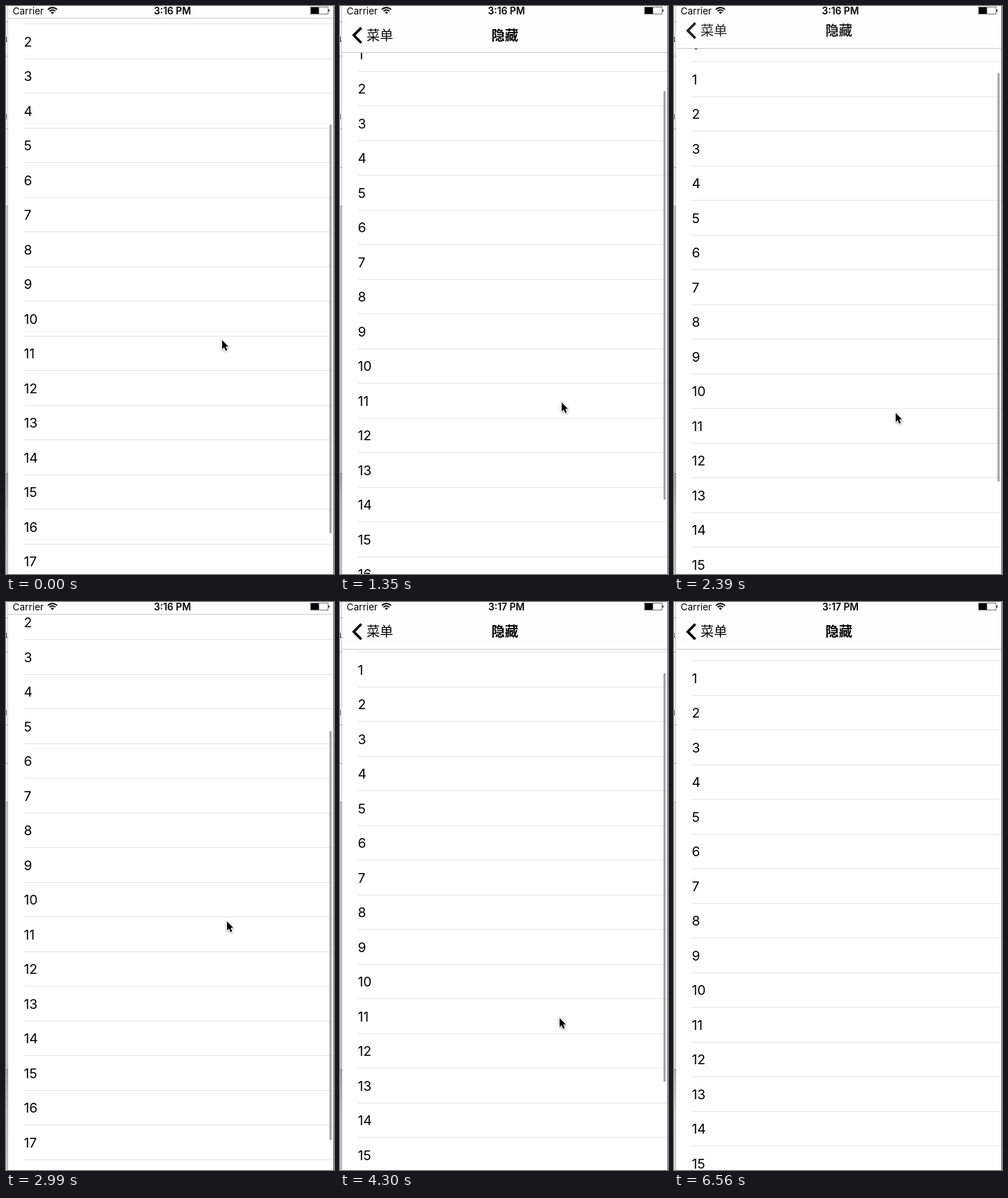
Animation, 469 px wide and 811 px high, one loop 6.61 s. Source, as an HTML page with a canvas:

```html
<!DOCTYPE html>
<html lang="zh">
<head>
<meta charset="utf-8">
<title>隐藏</title>
<style>
html, body { margin: 0; width: 100%; height: 100%; overflow: hidden; background: #fefefe; }
canvas { display: block; }
</style>
</head>
<body>
<canvas id="stage" width="469" height="811"></canvas>
<script>
const W = 469, H = 811, LOOP = 6610, PITCH = 49.5;
const LATIN = 'Inter, "Liberation Sans", sans-serif';
const CJK = '"Noto Sans CJK SC", "Noto Sans CJK", "Noto Sans CJK JP", sans-serif';
const g = document.getElementById('stage').getContext('2d');

const shortTicks = [13, 22, 23, 26, 29, 31, 33];
const tickTime = i => i * 150 - 10 * shortTicks.filter(s => s < i).length;

// Turning points of the hand: time, x, y.
const hand = [
  [-900, 293, 588], [525, 316, 430], [1612, 317, 588], [2250, 317, 588],
  [3280, 316, 426], [4180, 314, 594], [4740, 314, 594],
  [5180, 417, 789], [5330, 417, 789], [5780, 434, 805]
];

// Distance from the pointer to row "1"; it shifts when the list coasts.
const lag = [
  [0, 475.8], [300, 475.8], [650, 497.7], [1650, 497.7], [2250, 475.8],
  [2990, 475.8], [3430, 497.3], [4100, 497.3], [4600, 485.3]
];

const clamp = v => Math.min(1, Math.max(0, v));
const ease = p => (1 - Math.cos(Math.PI * p)) / 2;

function valueAt(keys, t, col = 1) {
  const next = keys.findIndex(k => k[0] > t);
  if (next < 0) return keys.at(-1)[col];
  const a = keys[next - 1], b = keys[next];
  return a[col] + (b[col] - a[col]) * ease((t - a[0]) / (b[0] - a[0]));
}

function poseAt(now) {
  let i = 0;
  while (tickTime(i + 1) <= now) i++;
  const t = tickTime(i);
  const x = valueAt(hand, t, 1), y = valueAt(hand, t, 2);
  const upward = valueAt(hand, t + 150, 2) < y;
  return {
    row: valueAt(hand, Math.min(t, 4740), 2) - valueAt(lag, t),
    pointer: t < 5780 && [Math.round(x), Math.round(y)],
    nav: clamp((y - (upward ? 538 : 517)) / 50),
    bar: t < 4740,
    clock: t < 3280 ? '3:16 PM' : '3:17 PM',
    pale: now >= 6560
  };
}

function box(color, x, y, w, h) {
  g.fillStyle = color;
  g.fillRect(x, y, w, h);
}

function text(s, x, y, font, align = 'left') {
  g.font = font;
  g.textAlign = align;
  g.fillStyle = '#000';
  g.fillText(s, x, y);
}

function path(points) {
  g.beginPath();
  points.forEach(p => g.lineTo(...p));
}

function drawRows(row) {
  for (let k = -1; k < 20; k++) {
    const mid = row + k * PITCH;
    box('#e5e5e7', 25, Math.floor(mid + PITCH / 2 - .25), W - 25, 1);
    text(String(k + 1), 25.5, mid + 6.8, '19.1px ' + LATIN);
  }
}

function drawScrollBar(row) {
  g.fillStyle = '#a0a0a0';
  g.beginPath();
  g.roundRect(462.6, 170 - .71 * row, 2.9, 584, 1.4);
  g.fill();
}

function drawNav(open) {
  const bottom = Math.round(17 + 50 * open);
  box('#fdfdfd', 3, 0, W - 3, bottom);
  box('#cbcbcd', 3, bottom, W - 3, 1);
  if (!open) return;
  g.save();
  g.globalAlpha = open;
  g.translate(0, -50 * (1 - open));
  g.strokeStyle = '#000';
  g.lineWidth = 3.6;
  path([[30.5, 31.5], [19.7, 42.4], [30.5, 53.3]]);
  g.stroke();
  text('菜单', 38, 49.3, '19px ' + CJK);
  text('隐藏', 235.7, 49.3, '600 19.2px ' + CJK, 'center');
  g.restore();
}

function drawStatus(clock) {
  text('Carrier', 9.5, 11.6, '13.6px ' + LATIN);
  text(clock, 238, 11.6, '600 13.8px ' + LATIN, 'center');
  const fan = r => {
    g.beginPath();
    g.arc(66.4, 11.2, r, -Math.PI * .76, -Math.PI * .24);
  };
  g.strokeStyle = '#000';
  g.lineWidth = 1.9;
  for (const r of [9, 5.6]) {
    fan(r);
    g.stroke();
  }
  fan(3);
  g.lineTo(66.4, 11.6);
  g.fill();
  g.strokeStyle = '#777';
  g.lineWidth = 1;
  g.strokeRect(435.5, 1.5, 25, 10);
  box('#000', 436, 2, 11.5, 9);
  box('#333', 461, 5, 1.5, 3);
}

// Sliver of the window behind the phone.
function drawEdges(pale) {
  box('#f0f0f0', 0, 0, 3, 286);
  box(pale ? '#dedede' : '#c6c6c6', 0, 286, 3, 382);
  const shade = g.createLinearGradient(0, 667, 0, H);
  shade.addColorStop(0, pale ? '#b8b8b8' : '#a4a4a4');
  shade.addColorStop(.4, pale ? '#d8d8d8' : '#c0c0c0');
  shade.addColorStop(1, pale ? '#dcdcdc' : '#c8c8c8');
  box(shade, 0, 667, 3, H - 667);
  for (const y of [22, 71, 175, 230, 285]) box('#b0b0b0', 0, y, 3, 1);
  box('#858585', 0, 667, 3, 1);
  box('rgba(0,0,0,.12)', 2, 0, 1, H);
  const ink = pale ? '#777' : '#333';
  box(ink, 0, 44, 1, 7);
  box(ink, 0, 50, 2, 1);
  box('#666', 0, 154, 1, 8);
  box('#6c6c6c', 468, 0, 1, H);
}

function drawPointer([x, y]) {
  g.save();
  g.translate(x, y);
  path([[0, 0], [0, 13], [2.9, 10.2], [5.1, 15.2], [7.3, 14.2], [5.2, 9.3], [9, 9.3]]);
  g.closePath();
  g.shadowColor = 'rgba(0,0,0,.4)';
  g.shadowBlur = 3;
  g.shadowOffsetY = 1;
  g.lineJoin = 'round';
  g.lineWidth = 1.8;
  g.strokeStyle = '#fff';
  g.stroke();
  g.shadowColor = 'transparent';
  g.fillStyle = '#000';
  g.fill();
  g.restore();
}

function draw(t) {
  const p = poseAt(t);
  box('#fefefe', 0, 0, W, H);
  drawRows(p.row);
  if (p.bar) drawScrollBar(p.row);
  drawNav(p.nav);
  drawStatus(p.clock);
  drawEdges(p.pale);
  if (p.pointer) drawPointer(p.pointer);
}

const start = performance.now();
function loop() {
  draw((performance.now() - start) % LOOP);
  requestAnimationFrame(loop);
}
loop();
</script>
</body>
</html>
```
